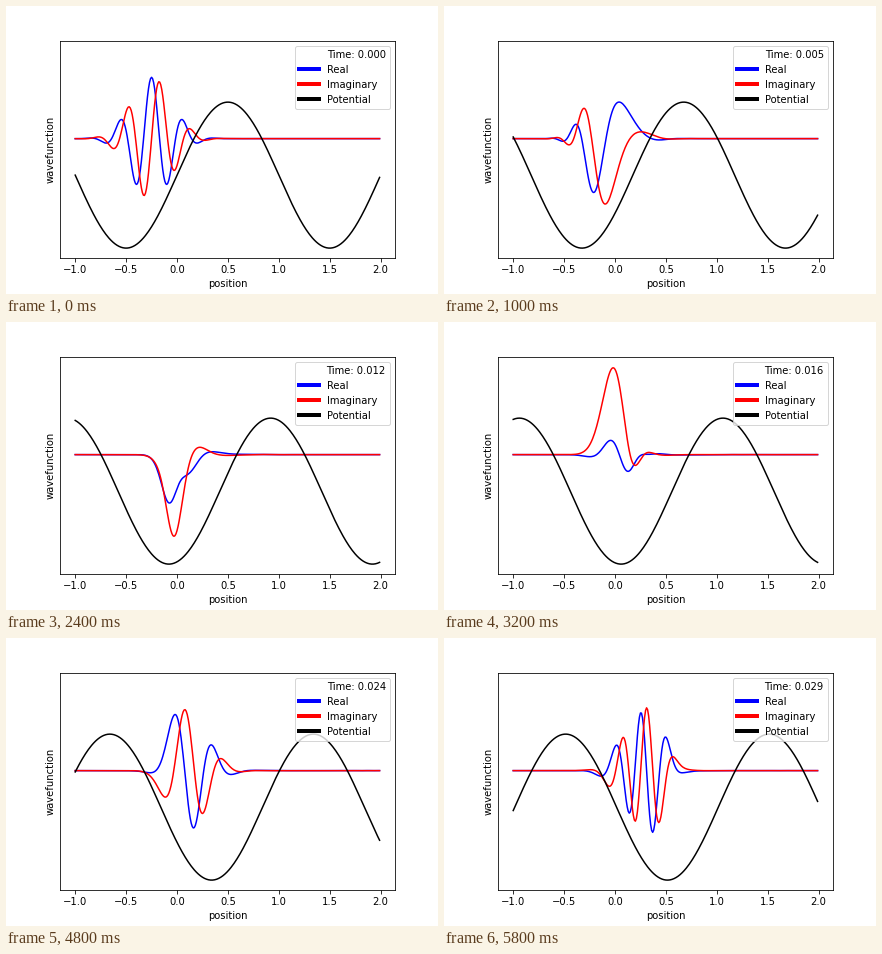
Animation, 432 px wide and 288 px high, one loop 6 s. Source, as a matplotlib script:

```python
import numpy as np
import matplotlib.pyplot as plt
from matplotlib.animation import FuncAnimation
from matplotlib.lines import Line2D

FRAMES = 30
FRAME_DT = 0.001
SUBSTEPS = 40
DT = FRAME_DT / SUBSTEPS

SPEED = 35.0      # drift of the potential
DEPTH = 1000.0    # amplitude of the potential
X0, SIGMA, K0 = -0.25, 0.2, 20.0

x = -1 + 0.01 * np.arange(300)
dx = 0.01


def wave(t):
    return np.sin(np.pi * (x - SPEED * t))


def kinetic_step():
    """Exact propagator of -d2/dx2 on the grid over one substep."""
    n = len(x)
    lap = 2 * np.eye(n) - np.eye(n, k=1) - np.eye(n, k=-1)
    energy, modes = np.linalg.eigh(lap / dx**2)
    return (modes * np.exp(-1j * energy * DT)) @ modes.T


def evolve():
    """Split-step solution of i psi' = -psi_xx + V psi, one row per frame."""
    step = kinetic_step()
    d = x - X0
    psi = (np.pi * SIGMA**2) ** -0.25 * np.exp(-d**2 / (2 * SIGMA**2) + 1j * K0 * d)
    rows = [psi]
    for n in range((FRAMES - 1) * SUBSTEPS):
        half = np.exp(-0.5j * DT * DEPTH * wave((n + 0.5) * DT))
        psi = half * (step @ (half * psi))
        if (n + 1) % SUBSTEPS == 0:
            rows.append(psi)
    return np.array(rows)


psi = evolve()
hill = np.array([2 * wave(i * FRAME_DT) - 1 for i in range(FRAMES)])

plt.rcParams.update({
    "font.family": "DejaVu Sans",
    "font.size": 10,
    "figure.subplot.bottom": 0.125,
    "figure.subplot.top": 0.88,
})
fig, ax = plt.subplots(figsize=(6, 4), dpi=72)
ax.set_xlabel("position")
ax.set_ylabel("wavefunction")
ax.set_yticks([])

real, = ax.plot(x, psi[0].real, "b")
imag, = ax.plot(x, psi[0].imag, "r")
pot, = ax.plot(x, hill[0], "k")

# limits that hold every frame, with the usual 5% margin
low = min(hill.min(), psi.real.min(), psi.imag.min())
high = max(hill.max(), psi.real.max(), psi.imag.max())
pad = 0.05 * (high - low)
ax.set_ylim(low - pad, high + pad)
pad = 0.05 * (x[-1] - x[0])
ax.set_xlim(x[0] - pad, x[-1] + pad)

keys = [Line2D([0], [0], color=c, lw=4) for c in "wbrk"]
legend = ax.legend(keys, ["Time: 0.000", "Real", "Imaginary", "Potential"],
                   loc="upper right")
clock = legend.get_texts()[0]


def update(i):
    real.set_ydata(psi[i].real)
    imag.set_ydata(psi[i].imag)
    pot.set_ydata(hill[i])
    clock.set_text(f"Time: {i * FRAME_DT:.3f}")
    return real, imag, pot, legend


anim = FuncAnimation(fig, update, frames=FRAMES, interval=200,
                     repeat=True, repeat_delay=0, blit=False)
plt.show()
```
